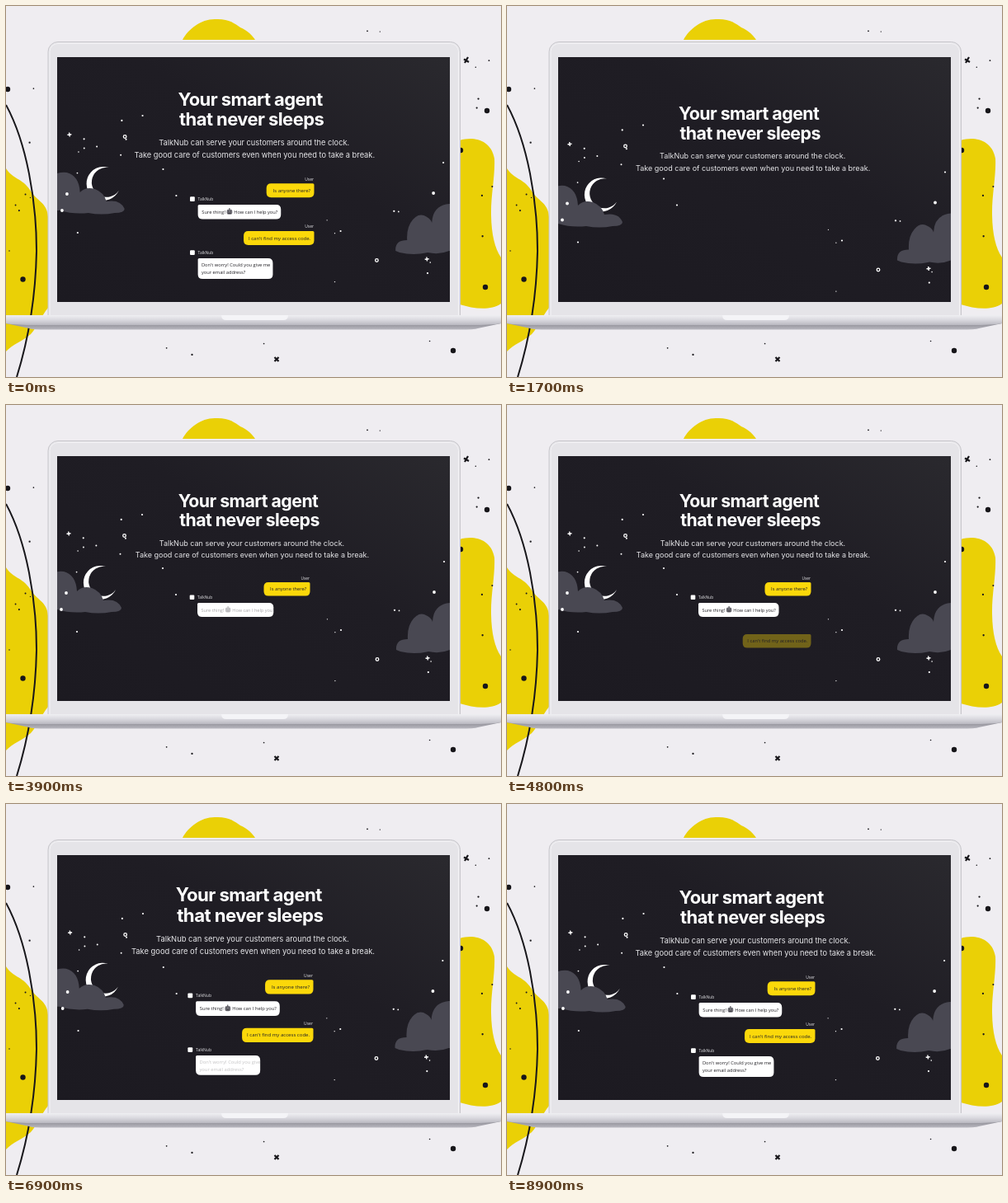
Animation, 600 px wide and 450 px high, one loop 9 s. Source, as an HTML page:

```html
<!DOCTYPE html>
<html lang="en">
<head>
<meta charset="utf-8">
<title>Night shift chat</title>
<style>
html, body { margin: 0; width: 100%; height: 100%; overflow: hidden; background: #efedf1; }
svg { display: block; width: 600px; height: 450px; }
.title { font: 700 21.3px Inter, Roboto, sans-serif; letter-spacing: -.55px; fill: #fff; text-anchor: middle; }
.sub { font: 400 9px Inter, Roboto, sans-serif; fill: #e6e6e9; text-anchor: middle; }
.chat { font: 5.55px "Open Sans", "Noto Sans", sans-serif; fill: #222126; }
.user { font-size: 5.8px; }
.label { font-size: 4.8px; fill: #e4e4e7; }
.end { text-anchor: end; }
</style>
</head>
<body>
<svg viewBox="0 0 600 450">
  <defs>
    <clipPath id="view"><path d="M62 62H538V359H62Z"/></clipPath>
    <linearGradient id="night" x1="0" y1="1" x2="1" y2="0">
      <stop offset="0" stop-color="#1c1a21"/><stop offset=".6" stop-color="#1f1d24"/><stop offset="1" stop-color="#2a292e"/>
    </linearGradient>
    <linearGradient id="deck" x2="0" y2="1">
      <stop offset="0" stop-color="#efeff2"/><stop offset=".5" stop-color="#d9d8de"/><stop offset="1" stop-color="#b9b8c0"/>
    </linearGradient>
    <linearGradient id="under" x2="0" y2="1">
      <stop offset="0" stop-color="#8f8e96"/><stop offset="1" stop-color="#b8b7bf"/>
    </linearGradient>
  </defs>

  <g fill="#ead006">
    <path d="M214 41C221 28 236 16 253 16C270 15 277 21 284 26C293 30 298 35 302 41Z"/>
    <path d="M0 197C8 210 20 209 29 223C37 237 50 238 51 256V366C42 377 37 391 30 398C20 407 8 410 0 419Z"/>
    <path d="M550 163C566 158 588 162 592 185C593 205 588 228 588 250C588 275 592 293 600 305V361C587 370 566 367 550 362Z"/>
  </g>
  <g id="specks" fill="#17161a"></g>
  <path d="M0 120C25 166 37 236 37 297C36 350 27 405 13 450" fill="none" stroke="#17161a" stroke-width="2"/>
  <path d="M555 64.500l6 3.500m-1-6l-4 7M325.500 426l5 5m0-5l-5 5" stroke="#17161a" stroke-width="2.200"/>

  <rect x="51" y="43.500" width="499.500" height="345" rx="12" fill="#e5e4e8" stroke="#c8c7cc"/>
  <rect x="53" y="45.500" width="495.500" height="340" rx="10" fill="none" stroke="#f3f2f5"/>
  <path d="M0 385H600L572 391Q568 392.500 550 392.500H50Q32 392.500 28 391Z" fill="url(#under)"/>
  <path d="M0 375H600V385Q590 387 560 387H40Q10 387 0 385Z" fill="url(#deck)"/>
  <path d="M261 375H342Q342 381 336 381H267Q261 381 261 375Z" fill="#f4f4f7"/>

  <g clip-path="url(#view)">
    <path fill="url(#night)" d="M62 62H538V359H62Z"/>
    <path id="moon" fill="#fff" d="M121 196A20.500 20.500 0 1 0 133 224A18 18 0 1 1 121 196Z"/>
    <path id="cloudL" fill="#494852" d="M40 215Q55 200 70 202Q85 206 86 226Q93 219 104 222Q115 226 118 237Q135 234 140 246Q140 251 128 251Q112 254 96 251Q78 253 62 248H40Z"/>
    <path id="cloudR" fill="#494852" d="M473 297Q472 284 487 284Q486 268 494 259Q502 250 511 256Q516 259 517 263Q518 242 538 240H560V297H538Q526 302 512 299Q495 303 478 299Z"/>
    <g id="stars" fill="#fff">
      <path d="M73.500 156.300l5-.600M75.700 153.500l.600 5M508.500 307.300l5-.600M510.700 304.500l.600 5" stroke="#fff" stroke-width="1.400"/>
      <g fill="none" stroke="#fff" stroke-width="1.300"><circle cx="143.500" cy="158.500" r="1.800"/><circle cx="450" cy="308.500" r="1.800"/></g>
    </g>
    <g id="scene">
      <g id="title" class="title"><text x="293.500" y="123.500">Your smart agent</text><text x="295" y="147.300">that never sleeps</text></g>
      <g id="sub" class="sub"><text x="298" y="170.500">TalkNub can serve your customers around the clock.</text><text x="298.500" y="185">Take good care of customers even when you need to take a break.</text></g>
      <g id="chat" class="chat"></g>
    </g>
  </g>
</svg>
<script>
const $ = id => document.getElementById(id);
const ramp = (t, start, length) => Math.max(0, Math.min(1, (t - start) / length));
const ease = (t, start, length) => {
  const p = ramp(t, start, length);
  return p * p * (3 - 2 * p);
};
const shift = (el, x, y) => el.setAttribute('transform', `translate(${x} ${y})`);

function add(parent, tag, attrs, text = '') {
  const el = document.createElementNS('http://www.w3.org/2000/svg', tag);
  for (const k in attrs) el.setAttribute(k, attrs[k]);
  el.textContent = text;
  return parent.appendChild(el);
}

let seed = 7;
const random = () => (seed = seed * 16807 % 2147483647) / 2147483647;
const dot = (parent, cx, cy, r) => add(parent, 'circle', {cx, cy, r});
function scatter(parent, count, x, y, w, h) {
  for (let i = 0; i < count; i++) dot(parent, x + w * random(), y + h * random(), .6 + .6 * random());
}

// Large specks and stars are placed, the fine ones are strewn.
const specks = $('specks'), stars = $('stars');
for (const [x, y] of [[2, 101], [583, 127], [551, 175], [581, 341], [20.5, 331.5], [542, 418]]) dot(specks, x, y, 3.2);
scatter(specks, 7, 4, 30, 36, 290);
scatter(specks, 7, 558, 33, 34, 270);
scatter(specks, 2, 436, 29, 34, 5);
scatter(specks, 4, 50, 405, 510, 27);
for (const [x, y] of [[67, 248], [73, 228], [519, 227]]) dot(stars, x, y, 1.9);
for (const [x, y] of [[165, 133], [190, 198], [206, 230], [86, 275], [531, 190], [406, 273]]) dot(stars, x, y, 1.1);
scatter(stars, 8, 66, 130, 84, 80);
scatter(stars, 7, 388, 235, 140, 100);

// A bubble whose top corner on the speaker's side is nearly square.
function bubble(x, y, w, h, right) {
  const r = 5.5, a = right ? r : 1.5, b = right ? 1.5 : r;
  return `M${x + a} ${y}h${w - a - b}q${b} 0 ${b} ${b}v${h - b - r}q0 ${r} ${-r} ${r}h${2 * r - w}` +
    `q${-r} 0 ${-r} ${-r}v${r + a - h}q0 ${-a} ${a} ${-a}z`;
}

function userMessage(start, x, y, text) {
  const label = add($('chat'), 'text', {class: 'label end', x: 368, y: y - 3.5}, 'User');
  const box = add($('chat'), 'g', {});
  add(box, 'path', {d: bubble(x, y, 368.5 - x, 16.5, true), fill: '#fbd80a'});
  add(box, 'text', {class: 'user end', x: 364.3, y: y + 10.3}, text);
  return t => {
    const p = ramp(t, start, 400);
    box.setAttribute('opacity', p);
    shift(box, 0, 11 * (1 - p));
    label.setAttribute('opacity', ramp(t, start + 200, 300));
  };
}

function botMessage(start, reply, y, w, h, fillText) {
  const box = add($('chat'), 'g', {});
  add(box, 'rect', {x: 222.7, y: y - 9.5, width: 5.6, height: 5.6, rx: 1, fill: '#fff'});
  add(box, 'text', {class: 'label', x: 232, y: y - 5}, 'TalkNub');
  const shape = add(box, 'path', {fill: '#fff'});
  const typing = [0, 1, 2].map(i => dot(box, 240.6 + 5 * i, y, 1.8));
  const words = add(box, 'g', {});
  fillText(words);
  return t => {
    const p = ease(t, reply, 300), beat = (t - start - 50) / 400 * 2 * Math.PI;
    box.setAttribute('opacity', ramp(t, start, 250));
    shape.setAttribute('d', bubble(232, y, 27 + (w - 27) * p, 17 + (h - 17) * p, false));
    typing.forEach((el, i) => {
      el.setAttribute('cy', y + 10 + 2.6 * Math.cos(beat - 1.5 * (i - 1)));
      el.setAttribute('opacity', 1 - ramp(t, reply - 50, 100));
    });
    words.setAttribute('opacity', ramp(t, reply + 130, 300));
  };
}

const messages = [
  userMessage(1900, 312.5, 215, 'Is anyone there?'),
  botMessage(2450, 3650, 240, 97.5, 17, g => {
    add(g, 'text', {x: 236.5, y: 250.5}, 'Sure thing!');
    add(g, 'rect', {x: 265.8, y: 245.5, width: 6.6, height: 6, rx: 2, fill: '#77767d'});
    add(g, 'path', {d: 'M269.1 246v-2M267.3 247.8h1M270 247.8h1M267.3 250h3.6', stroke: '#2b2a30', 'stroke-width': .9});
    add(g, 'text', {x: 274.3, y: 250.5}, 'How can I help you?');
  }),
  userMessage(4650, 285.7, 271, "I can't find my access code."),
  botMessage(5350, 6690, 303, 88, 24.3, g => {
    add(g, 'text', {x: 236.2, y: 312.7}, "Don't worry! Could you give me");
    add(g, 'text', {x: 236.2, y: 321.3}, 'your email address?');
  })
];

function draw(now) {
  let t = Math.floor(now % 9000 / 100) * 100;
  if (t < 100) t = 8900; // the loop opens on the finished chat

  // The page scrolls up, the camera pushes in, then settles back a little.
  const scroll = 1 - ease(t, 1300, 800);
  const push = ease(t, 4900, 1100);
  const settle = ease(t, 6000, 1900);
  const zoom = 1 + .01 * scroll + .053 * push - .021 * settle;
  const x = -3.6 * scroll - 16.4 * push + 9.6 * settle;
  const y = 28 * scroll - 14.8 * push + 8.1 * settle;
  $('scene').setAttribute('transform', `translate(${x} ${y}) scale(${zoom})`);

  const driftX = 2 * push + 1.7 * settle, driftY = 4 * (settle - push);
  const squeeze = .01 * push - .006 * settle;
  shift($('moon'), driftX, driftY + 27 * scroll);
  shift($('cloudL'), driftX, driftY + 32 * scroll);
  shift($('cloudR'), -200 * squeeze, driftY / 2 + 23 * scroll);
  stars.setAttribute('transform', `translate(${300 * squeeze} ${23 * scroll}) scale(${1 - squeeze} 1)`);

  const subIn = ramp(t, 280, 580);
  $('title').setAttribute('opacity', ramp(t, 100, 670));
  $('sub').setAttribute('opacity', subIn);
  shift($('sub'), 0, 13 * (1 - subIn));
  messages.forEach(update => update(t));
}

const begin = performance.now();
(function loop() {
  draw(performance.now() - begin);
  requestAnimationFrame(loop);
})();
</script>
</body>
</html>
```
